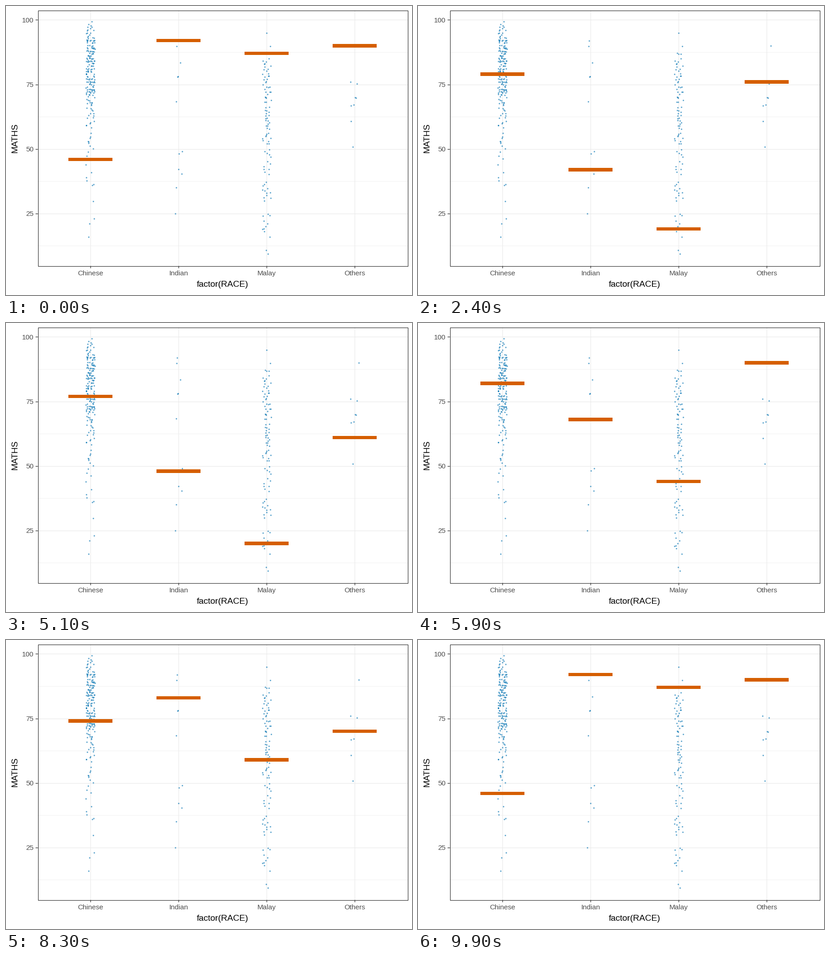
These frames come from a looping animation (885 px wide and 632 px high, 10 s). A matplotlib script:

```python
import numpy as np
import matplotlib.pyplot as plt
from matplotlib.animation import FuncAnimation
from matplotlib.patches import Rectangle

W, H, DPI = 885, 632, 100
LEFT, TOP, RIGHT, BOTTOM = 69, 9, 875, 568
GROUPS = ["Chinese", "Indian", "Malay", "Others"]
CENTERS = [184, 376, 568, 760]
BLUE, ORANGE, DARK = "#0072B2", "#D55E00", "#333333"

# Sampled score of each group, draw by draw
DRAWS = np.column_stack([
    [46, 89, 80, 78, 86, 92, 79, 87, 74, 74, 91, 85, 81,
     77, 86, 82, 72, 78, 78, 78, 70, 74, 80, 85, 77],
    [92, 42, 42, 92, 49, 49, 42, 78, 68, 35, 49, 78, 92,
     48, 42, 68, 49, 35, 68, 35, 48, 83, 40, 78, 68],
    [87, 75, 68, 64, 65, 79, 19, 63, 44, 18, 18, 64, 58,
     20, 71, 44, 66, 58, 64, 72, 32, 59, 53, 66, 24],
    [90, 67, 76, 70, 75, 67, 76, 70, 90, 67, 70, 76, 67,
     61, 70, 90, 67, 76, 70, 76, 76, 70, 75, 90, 70],
])

# Isolated points as (offset in px, score)
CHINESE = [(3, 99.3), (-5, 48.8), (-8, 47.2), (1, 46.2), (-10, 44),
           (2, 40.9), (-9, 38.9), (-8, 37.8), (4, 36), (7, 36.3),
           (6, 29.8), (8, 23.1), (-2, 21), (-4, 15.9)]
INDIAN = [(-3, 92), (-4, 89.8), (4, 83.4), (-2, 78), (-1, 78.1), (-5, 68.3),
          (8, 49), (1, 48.1), (0, 42.1), (7, 40.3), (-5, 35), (-7, 24.9)]
MALAY = [(0, 95), (8, 89.8), (3, 24.8), (7, 24.3), (-8, 24), (-6, 22.1),
         (2, 21.1), (-2, 20), (-6, 19.2), (-9, 18.9), (-5, 18.1), (7, 16),
         (-1, 10.8), (3, 9.3)]
OTHERS = [(9, 90), (-9, 76), (5, 75.3), (1, 70), (3, 69.8), (-2, 67.2),
          (-8, 66.8), (-8, 60.7), (-4, 50.9)]

# Crowded score ranges as (low, high, number of points)
CHINESE_BANDS = [(50, 56, 8), (58, 61, 6), (62, 66, 10), (67, 70, 11),
                 (71, 74, 24), (75, 78, 23), (79, 82, 20), (83, 86, 25),
                 (87, 90, 24), (91, 93, 17), (94, 98, 13)]
MALAY_BANDS = [(30, 37, 12), (40, 45, 7), (47, 50, 5), (52, 56, 10),
               (58, 66, 18), (68, 75, 15), (76, 79, 9), (80, 85, 10),
               (87, 87, 3)]


def score_y(score):
    return 594.9 - 5.645 * score


def offsets_and_scores(points, bands, rng):
    dx, scores = np.array(points, float).T
    for low, high, n in bands:
        whole = np.linspace(low, high, n).round()
        scores = np.r_[scores, whole + rng.uniform(-0.3, 0.3, n)]
        dx = np.r_[dx, rng.uniform(-9.6, 9.6, n)]
    return dx, scores


fig = plt.figure(figsize=(W / DPI, H / DPI), dpi=DPI, facecolor="white")
ax = fig.add_axes([0, 0, 1, 1])
ax.set(xlim=(0, W), ylim=(H, 0))
ax.axis("off")


def line(x, y, color, width, z):
    ax.plot(x, y, color=color, lw=width * 72 / DPI, zorder=z,
            solid_capstyle="butt", snap=True)


def label(x, y, text, px, color, **kw):
    ax.text(x, y, text, fontsize=px * 72 / DPI, color=color, va="baseline",
            family="Liberation Sans", **kw)


for score in np.arange(12.5, 100, 25):
    y = score_y(score)
    line([LEFT, RIGHT], [y, y], "#F1F1F1", 1, 1)
for score in range(25, 101, 25):
    y = score_y(score)
    line([LEFT, RIGHT], [y, y], "#EBEBEB", 1.3, 1)
    line([LEFT - 5, LEFT], [y, y], DARK, 1.3, 4)
    label(60.5, y + 5.6, str(score), 15.2, "#4D4D4D", ha="right")

rng = np.random.default_rng(7)
data = [(CHINESE, CHINESE_BANDS), (INDIAN, []), (MALAY, MALAY_BANDS),
        (OTHERS, [])]
for x, name, (points, bands) in zip(CENTERS, GROUPS, data):
    line([x, x], [TOP, BOTTOM], "#EBEBEB", 1.3, 1)
    line([x, x], [BOTTOM, BOTTOM + 5], DARK, 1.3, 4)
    label(x, 589, name, 15.2, "#4D4D4D", ha="center")
    dx, scores = offsets_and_scores(points, bands, rng)
    ax.scatter(x + dx, score_y(scores), s=(2.2 * 72 / DPI) ** 2, color=BLUE,
               alpha=0.5, linewidths=0.7, zorder=2)

ax.add_patch(Rectangle((LEFT + .5, TOP + .5), RIGHT - LEFT, BOTTOM - TOP,
                       fill=False, ec=DARK, lw=0.85, zorder=5, snap=True))
label(472, 614, "factor(RACE)", 19, "black", ha="center")
label(25, 289, "MATHS", 19, "black", ha="center", rotation=90,
      rotation_mode="anchor")

bars = [ax.add_patch(Rectangle((x - 48, 0), 96, 7, fc=ORANGE, lw=0, zorder=3))
        for x in CENTERS]

# Each draw holds, passes through one halfway frame, then the next one holds
starts = np.array([4 * k - (k > 12) for k in range(len(DRAWS) + 1)])
key_frames = np.column_stack([starts[:-1], starts[1:] - 2]).ravel()
key_frames = np.r_[key_frames, starts[-1]]
key_scores = np.vstack([np.repeat(DRAWS, 2, axis=0), DRAWS[:1]])


def update(frame):
    for bar, scores in zip(bars, key_scores.T):
        y = score_y(np.interp(frame, key_frames, scores))
        top, bottom = round(y - 3.7), round(y + 3.7)
        bar.set_y(top)
        bar.set_height(bottom - top)
    return bars


anim = FuncAnimation(fig, update, frames=100, interval=100, repeat=True,
                     repeat_delay=0, blit=False)
plt.show()
```
